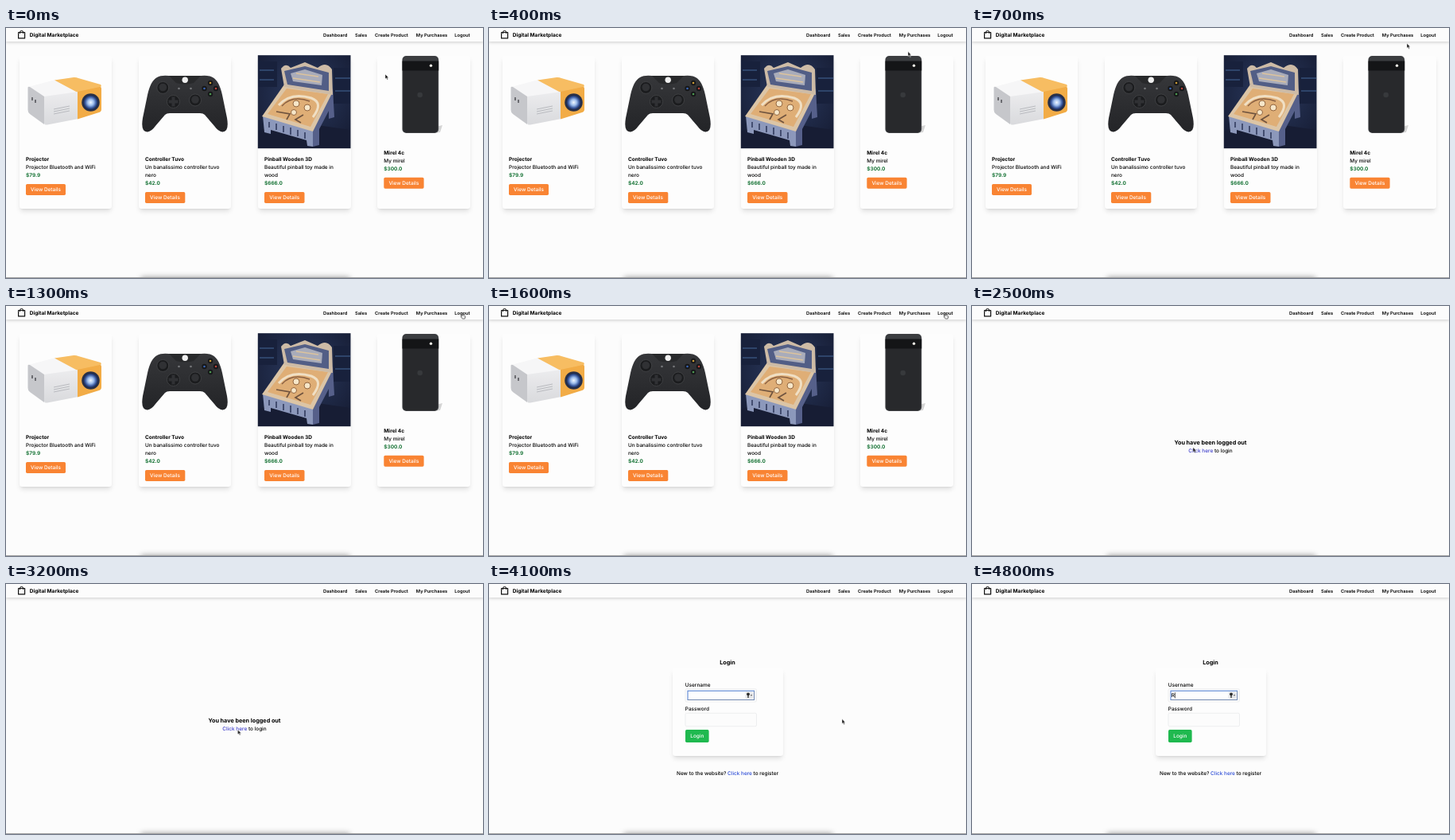
Write an HTML page that moves like this. It is 600 px wide and 314 px high and loops after 5 s.

```html
<!DOCTYPE html>
<html lang="en">
<head>
<meta charset="utf-8">
<title>Digital Marketplace</title>
<style>
  html, body { margin: 0; width: 100%; height: 100%; overflow: hidden; background: #fcfcfc; }
  .stage { position: relative; width: 600px; height: 314px; overflow: hidden; background: #fcfcfc; }
  .page, svg { position: absolute; left: 0; top: 0; width: 600px; height: 314px; }
  svg { display: block; }

  .card, .nav, .dock { position: absolute; }
  .card {
    top: 34.5px; width: 116.7px; height: 192px; background: #fdfdfd; border-radius: 3.3px;
    box-shadow: 0 4.2px 6.2px -1.2px rgba(0,0,0,.12), 0 1.7px 2.5px -1px rgba(0,0,0,.08);
  }
  .form { left: 230.5px; top: 106px; width: 139px; height: 110px; }
  .nav { left: 0; top: 0; width: 600px; height: 17px; background: #fcfcfc; box-shadow: 0 1.8px 3.6px rgba(0,0,0,.17); }
  .dock { left: 172px; top: 315px; width: 258px; height: 10px; box-shadow: 0 0 7px 2px rgba(0,0,0,.38); }
  .edge { position: absolute; left: 0; top: 313px; width: 600px; height: 1px; background: #a2a2a2; }

  text { font: 450 6.44px Inter, "Open Sans", sans-serif; fill: #000; text-rendering: geometricPrecision; }
  .b { font-weight: 700; font-size: 6.52px; }
  .h { font-weight: 700; font-size: 7.24px; text-anchor: middle; }
  .m { text-anchor: middle; }
  .menu text { font-size: 5.75px; font-weight: 600; }
  .price { font-weight: 700; fill: #197538; }
  .w { fill: #fff; }
  .link { fill: #3f3fcb; }
  .blue { fill: #2b4bd6; }
  .btn { fill: #f98433; }

  .shop, .bye, .login, .arrow, .hand, .caret, .letter { animation: 5s step-end infinite; }
  .shop { animation-name: shop; }
  .bye { animation-name: bye; }
  .login { animation-name: login; }
  .arrow { animation-name: arrow; }
  .hand { animation-name: hand; }
  .caret { animation-name: caret; }
  .letter { animation-name: letter; }
  .pointer { animation: move 5s linear infinite; }

  @keyframes shop { 0% { opacity: 1 } 34%, 100% { opacity: 0 } }
  @keyframes bye { 0% { opacity: 0 } 34% { opacity: 1 } 68%, 100% { opacity: 0 } }
  @keyframes login { 0% { opacity: 0 } 68%, 100% { opacity: 1 } }
  @keyframes arrow {
    0% { opacity: 1 } 22% { opacity: 0 } 34% { opacity: 1 } 58% { opacity: 0 }
    64% { opacity: 1 } 96%, 100% { opacity: 0 }
  }
  @keyframes hand {
    0% { opacity: 0 } 22% { opacity: 1 } 34% { opacity: 0 } 58% { opacity: 1 } 64%, 100% { opacity: 0 }
  }
  @keyframes caret { 0% { opacity: 0 } 84% { opacity: 1 } 90% { opacity: 0 } 94% { opacity: 1 } 96%, 100% { opacity: 0 } }
  @keyframes letter { 0% { opacity: 0 } 96%, 100% { opacity: 1 } }

  /* The pointer advances once every 100 ms */
  @keyframes move {
    0%   { transform: translate(477px, 58px); animation-timing-function: steps(3); }
    6%   { transform: translate(518px, 35px); animation-timing-function: steps(3); }
    12%  { transform: translate(545px, 18.5px); animation-timing-function: steps(1); }
    14%  { transform: translate(547px, 19.3px); animation-timing-function: steps(5); }
    24%  { transform: translate(573px, 8.8px); animation-timing-function: steps(1); }
    38%  { transform: translate(573px, 8.6px); animation-timing-function: steps(2); }
    42%  { transform: translate(515px, 45px); animation-timing-function: steps(2); }
    46%  { transform: translate(345px, 146px); animation-timing-function: steps(2); }
    50%  { transform: translate(278px, 177.5px); animation-timing-function: steps(2); }
    54%  { transform: translate(311px, 190px); animation-timing-function: steps(3); }
    60%  { transform: translate(291.5px, 183px); animation-timing-function: steps(1); }
    68%  { transform: translate(291.5px, 183px); animation-timing-function: steps(3); }
    74%  { transform: translate(312px, 181px); animation-timing-function: steps(2); }
    78%  { transform: translate(361px, 177px); animation-timing-function: steps(2); }
    82%  { transform: translate(444px, 169.5px); animation-timing-function: steps(4); }
    90%, 100% { transform: translate(455.5px, 233.5px); }
  }
</style>
</head>
<body>
<div class="stage">

  <div class="page shop">
    <div class="card" style="left:16.5px"></div>
    <div class="card" style="left:166.7px"></div>
    <div class="card" style="left:317px"></div>
    <div class="card" style="left:467px"></div>
    <svg viewBox="0 0 600 314">
      <defs>
        <linearGradient id="body" x1="0" y1="0" x2="0" y2="1">
          <stop offset="0" stop-color="#36373a"/><stop offset="1" stop-color="#232427"/>
        </linearGradient>
        <linearGradient id="front" x1="0" y1="0" x2="0" y2="1">
          <stop offset="0" stop-color="#ececee"/><stop offset="1" stop-color="#d9dadd"/>
        </linearGradient>
        <radialGradient id="lens">
          <stop offset="0" stop-color="#f0f7ff"/><stop offset=".4" stop-color="#9dbdec"/>
          <stop offset=".75" stop-color="#35549a"/><stop offset="1" stop-color="#1c2440"/>
        </radialGradient>
        <radialGradient id="room" cx=".5" cy=".4" r=".75">
          <stop offset="0" stop-color="#2b3a60"/><stop offset="1" stop-color="#141a30"/>
        </radialGradient>
      </defs>

      <!-- projector -->
      <path d="M28 74L62 65L90 81L48 87Z" fill="#f6f6f7"/>
      <path d="M61 65.500L85 62Q88 61.500 91 63L119 71Q121 73 118 75L90 81Z" fill="#f7bd62"/>
      <path d="M27.500 75Q27.500 73 30 74L48 86V121L30 108Q27.500 106 27.500 103Z" fill="#c6c7cb"/>
      <path d="M48 86L91 80V114L52 121.500Q48 122 48 119Z" fill="url(#front)"/>
      <path d="M90 80L118 74Q120 73.500 120 76V102Q120 105 117 106L90 114.500Z" fill="#f2ac46"/>
      <path d="M33 87v4M37 90v4" stroke="#55565b" stroke-width="1.600"/>
      <path d="M60 102l20-4M60 105l20-4M60 108l20-4" stroke="#b9babf" stroke-width="1"/>
      <circle cx="106.500" cy="93.500" r="11.300" fill="#2a3148"/>
      <circle cx="106.500" cy="93.500" r="9.500" fill="url(#lens)"/>

      <!-- controller -->
      <path d="M190 62Q195 59 205 60H245Q255 59 260 62Q268 66 272 84L278 113Q281 131 272 130.500Q267 130 262 123L250 109Q248 107 244 107H206Q202 107 200 109L188 123Q183 130 178 130.500Q169 131 172 113L178 84Q182 66 190 62Z" fill="url(#body)"/>
      <path d="M205 60H245L236 69Q225 72 214 69Z" fill="#28292b"/>
      <circle cx="225.200" cy="65.300" r="3.700" fill="#f0f0f0"/>
      <g fill="#1b1c1e" stroke="#46474a" stroke-width=".8">
        <circle cx="197.300" cy="75" r="7.500"/><circle cx="238" cy="90.500" r="7.500"/><circle cx="210.500" cy="92.500" r="8"/>
      </g>
      <g fill="#303134">
        <circle cx="197.300" cy="74.500" r="4.800"/><circle cx="238" cy="90" r="4.800"/>
        <path d="M208.500 86.500h4v4h4v4h-4v4h-4v-4h-4v-4h4z"/>
      </g>
      <g fill="#161719">
        <circle cx="257" cy="69" r="3.200"/><circle cx="249.500" cy="76" r="3.200"/>
        <circle cx="264" cy="76" r="3.200"/><circle cx="257" cy="83" r="3.200"/>
      </g>
      <circle cx="257" cy="69" r="1.300" fill="#c99a35"/><circle cx="249.500" cy="76" r="1.300" fill="#3b67b5"/>
      <circle cx="264" cy="76" r="1.300" fill="#b8443d"/><circle cx="257" cy="83" r="1.300" fill="#4c9650"/>
      <g fill="#77787b"><circle cx="217.500" cy="76" r="1.300"/><circle cx="232.500" cy="76" r="1.300"/></g>

      <!-- pinball table -->
      <rect x="316.800" y="34.200" width="116.700" height="117" fill="url(#room)"/>
      <path d="M317 42h24v32h-24zM412 50h21v45h-21z" fill="#18213c"/>
      <path d="M319 53h18M319 65h18M414 63h19M414 79h19" stroke="#36507a" stroke-width="1.500"/>
      <path d="M317 130L350 116L433 128V151H317Z" fill="#171d34"/>
      <path d="M323 110L386 128V149L379 148L378 141L333 128V133L325 131Z" fill="#8c98bb"/>
      <path d="M331 118v7M340 120v8M349 123v8M358 125v9M367 128v8M376 131v8" stroke="#434d70" stroke-width="2"/>
      <path d="M386 128L411 76L413 112L406 114V104L394 127V147L386 149Z" fill="#56608a"/>
      <path d="M350 71L411 80L386 130L322 111Z" fill="#dcc5a6"/>
      <path d="M353 76L405 83L383 124L329 108Z" fill="#dfae76"/>
      <path d="M346 51Q352 43 358 50L376 43L392 50Q403 41 410 52L411 84L350 74Z" fill="#cdbba6"/>
      <path d="M350 54L376 48L406 56L406 79L354 71Z" fill="#525e86"/>
      <path d="M358 57L376 52L398 59L397 72L361 67Z" fill="#a9acba"/>
      <path d="M361 63l34 5M365 57l28 4" stroke="#dcc39d" stroke-width="1.500"/>
      <path d="M343 97Q358 80 384 88Q400 94 386 112" fill="none" stroke="#f0dfc4" stroke-width="3"/>
      <path d="M347 98Q360 84 382 92" fill="none" stroke="#8a6042" stroke-width="1.500"/>
      <path d="M340 105l17 3-4 7M371 119l-7-4 10-6" fill="none" stroke="#70543f" stroke-width="1.700"/>
      <g fill="#f6e6c8" stroke="#94663f" stroke-width="1">
        <circle cx="365" cy="95" r="4"/><circle cx="379" cy="100" r="4"/><circle cx="362" cy="106" r="3.500"/>
      </g>

      <!-- phone -->
      <path d="M541 124L549 122L546 131L538 132Z" fill="#d5d5d5"/>
      <rect x="498.400" y="35" width="45.800" height="97" rx="5" fill="#46484b"/>
      <rect x="499.300" y="35.800" width="43.800" height="95.400" rx="4.300" fill="#28292c"/>
      <path d="M499.500 40Q499.500 36 503.500 36H539Q543 36 543 40V42H499.500Z" fill="#3b3d40"/>
      <rect x="498.500" y="41.500" width="45.700" height="12" fill="#141517"/>
      <circle cx="534.500" cy="47.300" r="1.700" fill="#f1eee6"/>
      <circle cx="520.700" cy="84" r="3.300" fill="#37393c"/>

      <g>
        <text class="b" x="25" y="166.800">Projector</text>
        <text x="25" y="176.800">Projector Bluetooth and WiFi</text>
        <text class="price" x="25" y="186.800">$79.9</text>
        <rect class="btn" x="25" y="196" width="50" height="14" rx="1.700"/>
        <text class="w m" x="50" y="205.300">View Details</text>
      </g>
      <g>
        <text class="b" x="175" y="166.800">Controller Tuvo</text>
        <text x="175" y="176.800">Un banalissimo controller tuvo</text>
        <text x="175" y="186.800">nero</text>
        <text class="price" x="175" y="196.800">$42.0</text>
        <rect class="btn" x="175" y="206" width="50.300" height="14" rx="1.700"/>
        <text class="w m" x="200" y="215.300">View Details</text>
      </g>
      <g>
        <text class="b" x="325" y="166.800">Pinball Wooden 3D</text>
        <text x="325" y="176.800">Beautiful pinball toy made in</text>
        <text x="325" y="186.800">wood</text>
        <text class="price" x="325" y="196.800">$666.0</text>
        <rect class="btn" x="325" y="206" width="50.500" height="14" rx="1.700"/>
        <text class="w m" x="350.300" y="215.300">View Details</text>
      </g>
      <g>
        <text class="b" x="475.300" y="158.500">Mirel 4c</text>
        <text x="475.300" y="168.500">My mirel</text>
        <text class="price" x="475.300" y="178.500">$300.0</text>
        <rect class="btn" x="475.300" y="187.700" width="50.300" height="14" rx="1.700"/>
        <text class="w m" x="500.400" y="197">View Details</text>
      </g>
    </svg>
  </div>

  <div class="page bye">
    <svg viewBox="0 0 600 314">
      <text class="h" x="300" y="173.500">You have been logged out</text>
      <text class="m" x="300" y="184.300"><tspan class="link">Click here</tspan> to login</text>
    </svg>
  </div>

  <div class="page login">
    <div class="card form"></div>
    <svg viewBox="0 0 600 314">
      <text class="h" x="300" y="100.800">Login</text>
      <text x="246.800" y="128.500">Username</text>
      <rect x="247" y="131.700" width="89.500" height="16.300" rx="1.700" fill="#fcfcfc" stroke="#e3e4e6" stroke-width=".6"/>
      <rect x="250" y="134.200" width="83.500" height="11.300" fill="#fdfdfe" stroke="#4a7bd0" stroke-width="1"/>
      <path d="M250 145.500H333.500V134.500" fill="none" stroke="#7e8da8" stroke-width=".8"/>
      <rect x="322.500" y="135.500" width="9.800" height="8.700" rx="1" fill="#e6e7e9"/>
      <circle cx="326" cy="138.300" r="1.900" fill="#2b2b2b"/>
      <path d="M326 139V143" stroke="#2b2b2b" stroke-width="1.300"/>
      <path d="M328.800 139.300h2.400l-1.200 1.500z" fill="#444"/>
      <rect class="caret" x="251" y="136.200" width=".6" height="7.300" fill="#111"/>
      <g class="letter">
        <text x="250.800" y="142.200">R</text>
        <rect x="254.900" y="136.200" width=".7" height="7.300" fill="#111"/>
      </g>
      <text x="246.800" y="159.200">Password</text>
      <rect x="247" y="162.200" width="89.500" height="16.600" rx="1.700" fill="#fcfcfc" stroke="#e3e4e6" stroke-width=".6"/>
      <rect x="247" y="183" width="29.600" height="16" rx="1.700" fill="#1fb94f"/>
      <text class="w m" x="261.800" y="193.300">Login</text>
      <text class="m" x="300" y="240.300">New to the website? <tspan class="blue">Click here</tspan> to register</text>
    </svg>
  </div>

  <div class="dock"></div>
  <div class="edge"></div>
  <div class="nav"></div>
  <svg viewBox="0 0 600 314">
    <g fill="none" stroke="#111" stroke-width="1.200" stroke-linejoin="round">
      <path d="M15.600 5.500H23.600V12.900H15.600Z"/>
      <path d="M17.500 7.200V5.500Q17.500 3.400 19.600 3.400Q21.700 3.400 21.700 5.500V7.200" stroke-width="1"/>
    </g>
    <text class="b" x="29.700" y="10.900">Digital Marketplace</text>
    <g class="menu">
      <text x="399" y="10.500">Dashboard</text>
      <text x="439" y="10.500">Sales</text>
      <text x="464" y="10.500">Create Product</text>
      <text x="515.800" y="10.500">My Purchases</text>
      <text x="564.200" y="10.500">Logout</text>
    </g>

    <g class="pointer">
      <path class="arrow" d="M0 0V6L1.400 4.800L2.400 7.100L3.500 6.600L2.500 4.400H4.300Z" fill="#111" stroke="#fff" stroke-width=".5"/>
      <path class="hand" d="M.3 .6Q1.200 -.2 1.700 .8V3L4.100 3.400Q4.900 3.700 4.700 4.700L4.100 7H1.100L-.9 4.600Q-.8 3.700 .3 4.300Z" fill="#fff" stroke="#222" stroke-width=".7" stroke-linejoin="round"/>
    </g>
  </svg>
</div>
</body>
</html>
```
